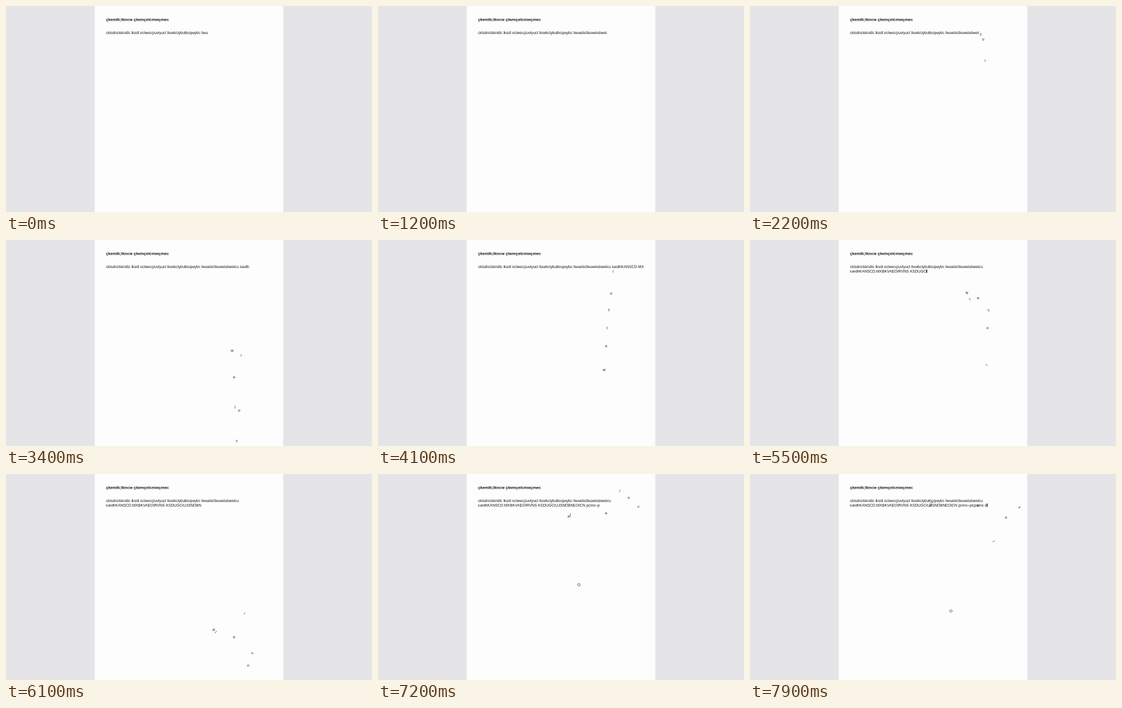
Animation of 600x338 px, one loop 8 s. Source, as an HTML page with a canvas:

```html
<!DOCTYPE html>
<html lang="en">
<head>
<meta charset="utf-8">
<title>Falling letters</title>
<style>
html, body { margin: 0; width: 100%; height: 100%; overflow: hidden; background: #e5e4e6; }
canvas { display: block; width: 600px; height: 338px; }
</style>
</head>
<body>
<canvas id="stage" width="1200" height="676"></canvas>
<script>
const ctx = document.getElementById('stage').getContext('2d');
ctx.scale(2, 2); // double resolution keeps the small type unhinted

const LOOP = 8000, LEFT = 164, FLOOR = 332, SIZE = 6.236;
const BASELINES = [46.2, 53.3];
const FONT = '"Liberation Sans", Arial, sans-serif';
const opening = 'cklsdnclskndlc lksdl oclwecçiuvlyucl lluwbclybulbcqwybc liwu';
const first = 'ebclbuwelubwelcu ';
const second = 'iuedhKANSCD.MXBKVAEOIRVNS KSDUGCIUJSNDBNEOICN pcms~picpirins c';
const WRAP = first.length + 14; // beyond this count the last word moves to line two

// [time, typed characters]: changes of typing pace, pauses and backspacing
const pace = [
  [0, 0], [100, 2], [200, 2], [1000, 13.2], [1200, 14], [1540, 18], [1680, 18],
  [2487, 12], [2620, 11], [3400, 22.5], [4100, 31.5], [4700, 40.5], [4900, 44.5],
  [5600, 50.5], [6200, 59], [6300, 59], [6400, 58], [7900, 79.5]
];

// Deleted characters fall, bounce twice and drift apart after meeting in the air
const BACKSPACE = 134.5, FALL = 1322, ARC = 2700, MEET = 4900, SPIN_FROM = 4300;
const letters = [
  { index: 17, contact: 5848, drift: 4.8, spin: -183 },
  { index: 15, contact: 6061, drift: 12.5, spin: 80 },
  { index: 14, contact: 6196, drift: 21, spin: -35 },
  { index: 13, contact: 6288, drift: -26, spin: 120 },
  { index: 12, contact: 6255, drift: 0, spin: -22 },
  { index: 11, contact: 6280, drift: -25, spin: 182 },
  { index: 58, release: 6300, contact: 10400, drift: 0, spin: 0 }
];

function typedAt(t) {
  for (let i = 1; i < pace.length; i++) {
    const [a, from] = pace[i - 1], [b, to] = pace[i];
    if (t < b) return Math.floor(from + (to - from) * (t - a) / (b - a));
  }
  return Math.floor(pace[pace.length - 1][1]);
}

function rows(count) {
  const text = (first + second).slice(0, count);
  return count > WRAP
    ? [opening + first, text.slice(first.length)]
    : [opening + text];
}

function setFont(weight = 'normal') {
  ctx.font = `${weight} 100px ${FONT}`;
}

// Type is set at 100px and scaled down so advances stay fractional
function write(str, x, y, size = SIZE, weight) {
  ctx.save();
  ctx.translate(x, y);
  ctx.scale(size / 100, size / 100);
  setFont(weight);
  ctx.fillText(str, 0, 0);
  ctx.restore();
}

function caret(lines) {
  setFont();
  const row = lines.length - 1;
  return { x: LEFT + ctx.measureText(lines[row]).width * SIZE / 100, y: BASELINES[row] };
}

function prepare(letter) {
  const order = letter.release ? 0 : first.length - letter.index;
  const start = caret(rows(letter.index + 1));
  return {
    release: 1680 + BACKSPACE * order,
    ...letter,
    order,
    ch: (first + second)[letter.index],
    x: start.x + 0.4,
    top: start.y - 1.8
  };
}

function height({ top, release, contact, order }, t) {
  const landing = release + FALL;
  if (t < landing) return top + (FLOOR - top) * ((t - release) / FALL) ** 2;
  const again = t >= contact;
  const u = again ? (t - contact) / ARC : (t - landing) / (contact - landing);
  const rise = (again ? 304 : 296) - 2 * order;
  return FLOOR - rise * 4 * u * (1 - u);
}

function drawLetter(letter, t) {
  if (t < letter.release) return;
  const since = from => Math.max(0, t - from) / 1000;
  setFont();
  const half = ctx.measureText(letter.ch).width * SIZE / 200;
  ctx.save();
  ctx.translate(letter.x + letter.drift * since(MEET), height(letter, t));
  ctx.rotate(letter.spin * since(SPIN_FROM) * Math.PI / 180);
  write(letter.ch, -half, /[A-Zi]/.test(letter.ch) ? 2.2 : 1.6);
  ctx.restore();
}

const falling = letters.map(prepare);

function draw(t) {
  ctx.fillStyle = '#e5e4e6';
  ctx.fillRect(0, 0, 600, 338);
  ctx.fillStyle = '#fefdfe';
  ctx.fillRect(145.5, 0, 309, 338);

  ctx.fillStyle = '#141414';
  write('çkemlk;lkncw çlwmçelcmwçmec', LEFT, 24.6, 6.67, 'bold');
  const lines = rows(typedAt(t));
  lines.forEach((line, i) => write(line, LEFT, BASELINES[i]));
  if (t % 1000 >= 500) {
    const { x, y } = caret(lines);
    ctx.fillRect(x, y - 4.8, 1.5, 5.2);
  }
  falling.forEach(letter => drawLetter(letter, t));
}

function frame() {
  draw(performance.now() % LOOP);
  requestAnimationFrame(frame);
}
frame();
</script>
</body>
</html>
```
